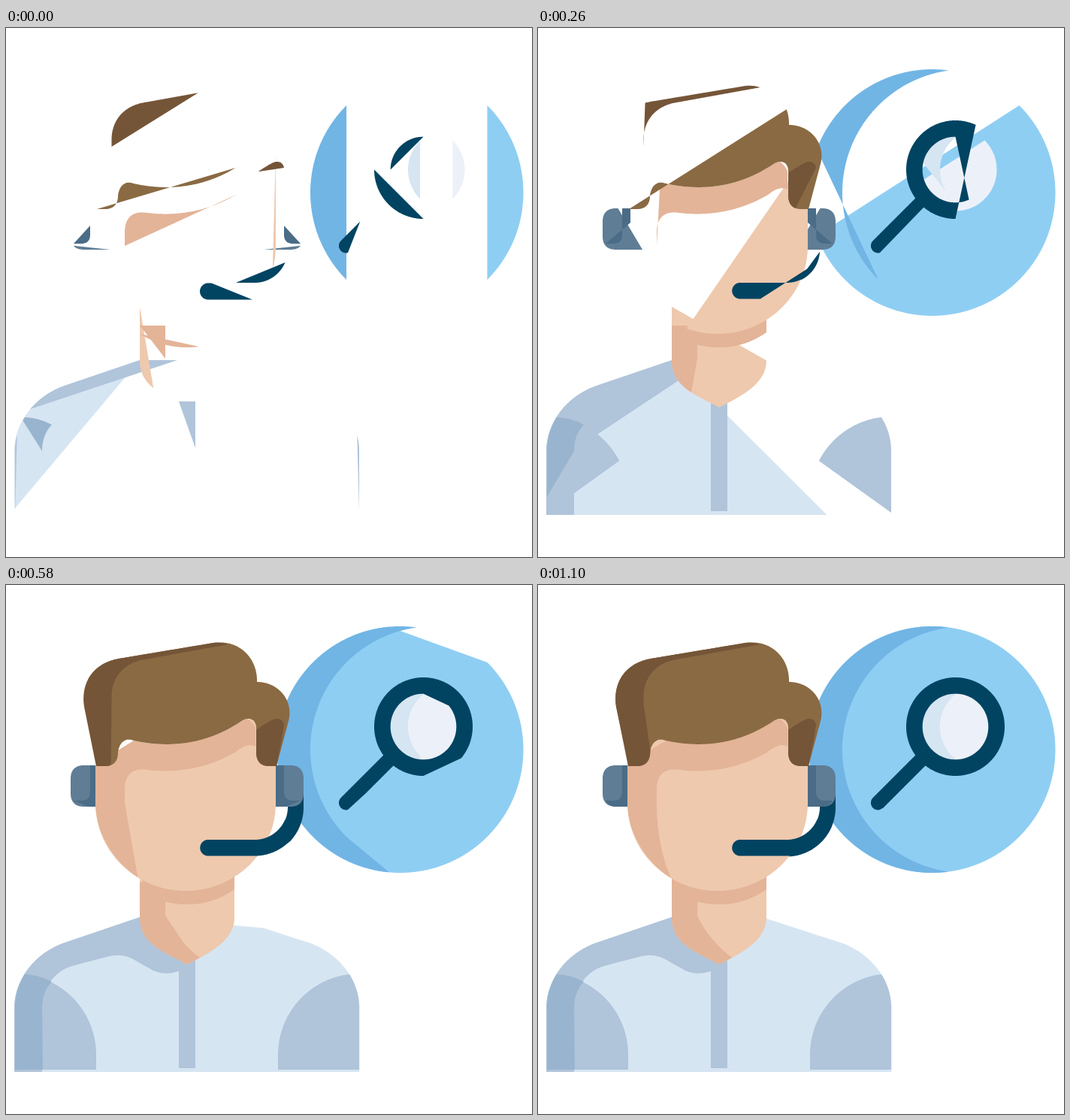
An HTML page with a canvas that plays this animation: 700 by 704 pixels, repeating every 1600 ms.

```html
<!DOCTYPE html>
<html lang="en">
<head>
<meta charset="utf-8">
<title>Support agent</title>
<style>
  html, body { margin: 0; width: 100%; height: 100%; overflow: hidden; background: #fff; }
  canvas { display: block; }
</style>
</head>
<body>
<canvas id="stage" width="700" height="704"></canvas>
<script>
const ctx = document.getElementById('stage').getContext('2d');
const LOOP = 1600, STEP = 20, REVEAL = 1100, FIRST = .25;
const MIRROR = 482; // sum of x for a left and right twin

const SKY = '#8fcef3', SKY_DARK = '#71b5e5', GLASS = '#ecf1f9', SHIRT = '#d6e5f2',
      SHIRT_DARK = '#b0c4da', SLEEVE = '#99b4ce', NAVY = '#004462', SKIN = '#eec9ae',
      SKIN_DARK = '#e3b498', HAIR = '#8a6a43', HAIR_DARK = '#755538',
      CUP = '#5f7d95', CUP_DARK = '#4a6c86';

// Circle outline from a starting angle; sweep 1 runs clockwise
function circle(cx, cy, r, deg, sweep = 1) {
  const a = deg * Math.PI / 180, x = r * Math.cos(a), y = r * Math.sin(a);
  const half = s => ` a${r},${r} 0 1 ${sweep} ${-2 * s * x},${-2 * s * y}`;
  return `M${cx + x},${cy + y}` + half(1) + half(-1);
}

// Left part of a circle, cut by the same circle moved right
function crescent(cx, cy, r, shift) {
  const k = r * Math.SQRT1_2, h = Math.sqrt(r * r - shift * shift / 4);
  const tipX = cx + shift / 2, start = `${cx + shift - k},${cy + k}`;
  const arc = (flags, to) => ` A${r},${r} 0 ${flags} ${to}`;
  return 'M' + start + arc('0 1', `${tipX},${cy - h}`) + arc('1 0', `${tipX},${cy + h}`) + arc('0 1', start);
}

// Points about 1px apart along a path
function sample(d) {
  const path = document.createElementNS('http://www.w3.org/2000/svg', 'path');
  path.setAttribute('d', d);
  const len = path.getTotalLength(), n = Math.ceil(len);
  return Array.from({ length: n + 1 }, (_, i) => {
    const { x, y } = path.getPointAtLength(len * i / n);
    return [x, y];
  });
}

const shapes = [];
const add = (color, ...paths) => shapes.push({ color, lines: paths.map(sample) });
function addPair(color, d) {
  const line = sample(d);
  shapes.push({ color, lines: [line] }, { color, lines: [line.map(([x, y]) => [MIRROR - x, y])] });
}

// Edges shared by neighbouring shapes
const shoulder = 'L75,477 C36,492 11,527 11,563 V648';
const armhole = 'V563 C12,546 17,531 25,518';
const throat = 'V442 C178,478 210,488 241,505';
const fringe = 'C151,208 160,203 170,207 C220,218 268,211 312,182 Q321,175 329,180 Q333,184 333,190';
const sideburn = 'V222 Q333,241 350,241 H360';
const crown = 'L150,98 C117,104 99,129 104,162';

// Bubble and magnifier
add(SKY, circle(524.5, 219, 164, -45));
add(SKY_DARK, crescent(524.5, 219, 164, 44.5));
add(GLASS, circle(555.5, 188.5, 55, -45));
add(SHIRT, crescent(555.5, 188.5, 55, 34.5));
add(NAVY, 'M455,299.1 A9.6,9.6 0 0 1 445.8,283 l68.8,-68.8 l13.6,13.6 l-68.8,68.8 Z');
add(NAVY, circle(555.5, 188.5, 65.5, 90), circle(555.5, 188.5, 43.8, -90, 0));

// Shirt
add(SHIRT, `M178,442 ${shoulder} H470.5 V563 C470.5,527 445,492 406,477 L304,444 Z`);
add(SHIRT_DARK, `M228,442 H178 ${shoulder} H48 V566 C48,535 65,514 88,507 L138,494
  Q155,490 171,499 L194,512 Q212,521 232,513 L275,475 L280,442 Z`);
addPair(SHIRT_DARK, `M12,645 ${armhole} A108,108 0 0 1 120,625 V645 Z`);
add(SLEEVE, 'M48,563 C48,548 53,536 61,528 Q44,519 25,518 C17,531 12,546 12,563 V645 H49 Z');
add(SHIRT_DARK, 'M230,497 h22 v146 h-22 Z');

// Neck
add(SKIN, `M178,371 ${throat} C270,490 304,474 304,442 V371 Z`);
add(SKIN_DARK, `M212,440 V396 H178 ${throat} L258,496 Q227,472 212,440`);
add(SKIN_DARK, 'M178,407 C215,430 265,433 304,405 V371 H178 Z');

// Headset behind the face
add(NAVY, `M328,361.5 H269 a11,11 0 0 1 0,-22 H331 a44,44 0 0 0 44,-44 v-20 h21 v20
  a65.5,65.5 0 0 1 -65,66 Z`);
addPair(CUP, 'M139,295 H104 Q86,295 86,277 V258 Q86,240 104,240 H139 Z');
addPair(CUP_DARK, 'M90,287 H100 Q112,287 112,275 V240 H123 V295 H104 Q95,295 90,287');

// Face
add(SKIN, 'M359,166 V290 a120,117 0 0 1 -240,0 V166');
add(SKIN_DARK, `M158,290 V272 C158,251 170,243 188,246 C230,251 270,243 306,222 Q322,209 332,215
  V190 Q321,170 312,182 C268,211 220,218 170,207 L149,220 L119,240 V288
  C119,330 143,368 177,390 Q158,346 158,290`);

// Hair
add(HAIR, `M121,241 H133 Q149,240 149,223 ${fringe} ${sideburn} L376,181
  C383,153 362,129 334,129 C335,98 311,72 276,77 ${crown} Z`);
add(HAIR_DARK, `M140.5,158 V150 C140,122 158,103 185,99 L296,79 Q286,76 276,77 ${crown}
  L120,241 H133 Q149,240 149.5,221 Z`);
add(HAIR_DARK, `M370,186 Q368,177 359,178 Q353,179 333,193 ${sideburn} L368,200 Z`);

// Microphone arm in front of the face
add(NAVY, 'M371.5,312 A44,44 0 0 1 331,339 H269 a10.75,10.75 0 0 0 0,21.5 H331 A65.5,65.5 0 0 0 391,321 Z');

// Height of a CSS-style cubic-bezier curve at x
function bezier(x1, y1, x2, y2, x) {
  const at = (a, b, s) => 3 * s * (1 - s) * ((1 - s) * a + s * b) + s ** 3;
  let s = .5;
  for (let d = .25; d > 1e-6; d /= 2) s += at(x1, x2, s) < x ? d : -d;
  return at(y1, y2, s);
}

// Drawn share of every outline
const share = t => t >= REVEAL ? 1 : FIRST + (1 - FIRST) * bezier(.215, .31, .4, 1, t / REVEAL);

function trace(line, p) {
  const end = p * (line.length - 1), n = Math.floor(end), f = end - n;
  ctx.moveTo(...line[0]);
  for (let i = 1; i <= n; i++) ctx.lineTo(...line[i]);
  if (f) {
    const [x, y] = line[n], [x2, y2] = line[n + 1];
    ctx.lineTo(x + (x2 - x) * f, y + (y2 - y) * f);
  }
  ctx.closePath();
}

function draw(t) {
  const p = share(t);
  ctx.fillStyle = '#fff';
  ctx.fillRect(0, 0, 700, 704);
  for (const { color, lines } of shapes) {
    ctx.beginPath();
    for (const line of lines) trace(line, p);
    ctx.fillStyle = color;
    ctx.fill();
  }
}

const start = performance.now();
function tick() {
  const t = (performance.now() - start) % LOOP;
  draw(Math.floor(t / STEP) * STEP);
  requestAnimationFrame(tick);
}
tick();
</script>
</body>
</html>
```
